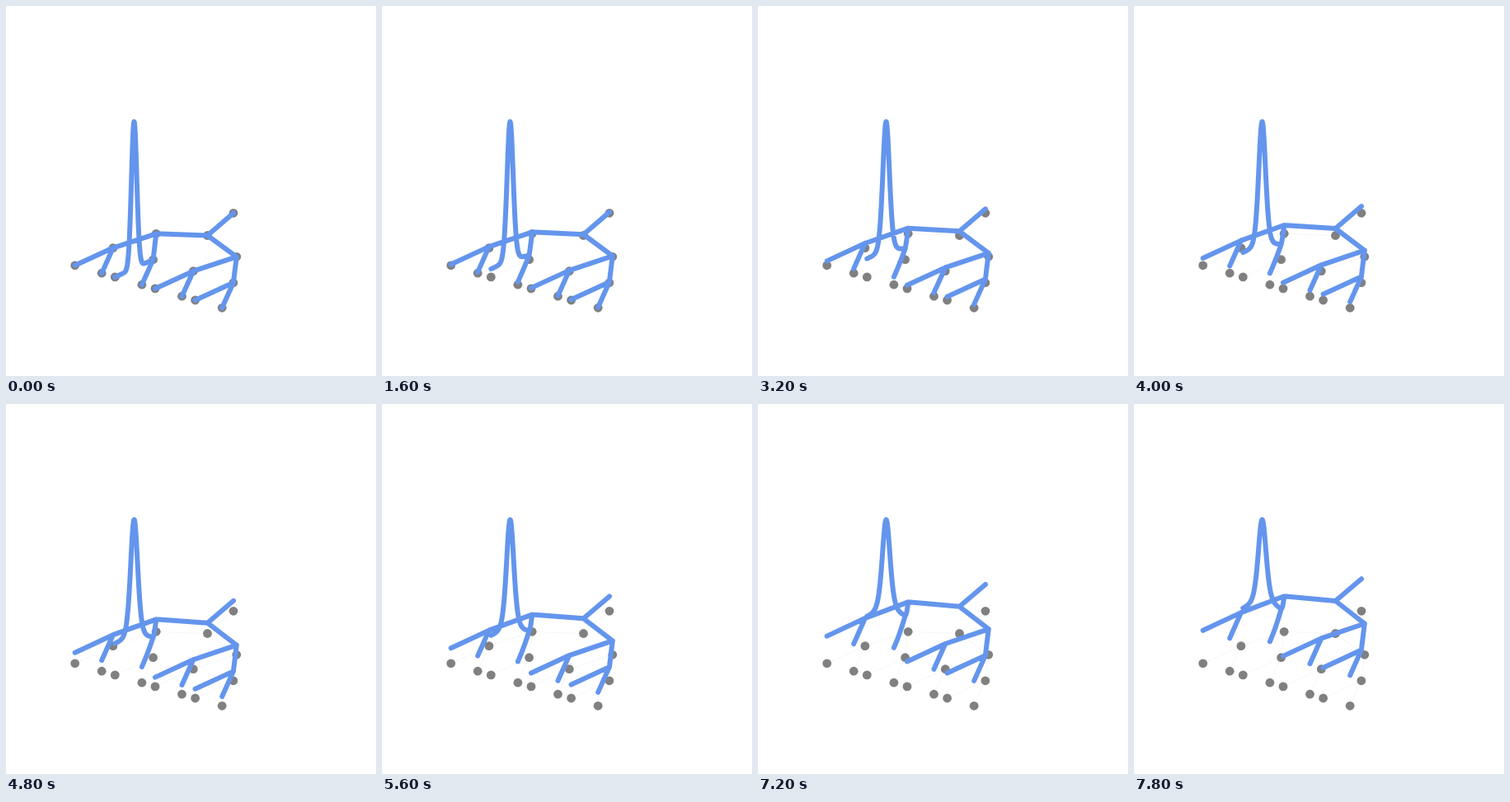
Write an HTML page that moves like this. It is 449x449 px and loops after 8 s.

```html
<!DOCTYPE html>
<html lang="en">
<head>
<meta charset="utf-8">
<title>Spreading on a tree</title>
<style>
  html, body { margin: 0; width: 100%; height: 100%; overflow: hidden; background: #fff; }
  svg { display: block; width: 100vw; height: 100vh; }
  path { fill: none; stroke-linecap: round; stroke-linejoin: round; }
  #ground { stroke: #f7f7f7; stroke-width: 1; }
  #dots { fill: #808080; }
  #surface { stroke: #6495ed; stroke-width: 6; }
</style>
</head>
<body>
<svg viewBox="0 0 449 449">
  <path id="ground"/>
  <g id="dots"></g>
  <path id="surface"/>
</svg>
<script>
  const LOOP = 8000, STEP = 200, LAST = LOOP / STEP - 1;
  const PEAK = 178;

  // x, y on the ground, and the final lift above the common level
  const nodes = {
    A: [276, 251.3, 2], B: [244.5, 278.5, 2.5], C: [182.2, 276.3, 6], D: [279.8, 304.3, 0.8],
    E: [129.9, 293.6, 3.5], F: [178.6, 307.7, 22], G: [83.7, 314.8, 3], H: [116.2, 324.2, 3],
    I: [132.3, 328.9, 44], J: [164.9, 338.2, 13], K: [227.3, 321.7, 0.3], L: [275.9, 335.8, 0.3],
    M: [181, 342.9, 0], N: [213.5, 352.2, 0], O: [229.6, 357, 0], P: [262.2, 366.3, 0]
  };
  const edges = 'AB BC BD CE FC EG EH IF FJ DK DL KM KN LO LP'.split(' ');
  const bent = ['FC', 'FJ'];

  const mix = (a, b, s) => a + (b - a) * s;
  const settle = s => 1 - (1 - s) ** 2;
  const polyline = points =>
    'M' + points.map(([x, y]) => x.toFixed(2) + ' ' + y.toFixed(2)).join('L');

  function spikeHeight(left, right, s, tau) {
    const d = 46.3 * (s - 0.5);
    const base = mix(left, right, Math.max(0, 2 * s - 1));
    const grow = tau ** 0.7;
    const sigma = 3.25 + 1.25 * grow;
    const k = 1 / (0.02 + 0.23 * grow);
    return base + (PEAK - base) * (1 + d * d / (2 * k * sigma * sigma)) ** -k;
  }

  function edgePath(name, tau) {
    const [a, b] = [...name].map(id => nodes[id]);
    const level = 37 * tau ** 2.45;
    const ha = level + a[2] * tau, hb = level + b[2] * tau;
    const spike = name === 'IF';
    const count = spike ? 120 : bent.includes(name) ? 12 : 1;
    const points = [];
    for (let i = 0; i <= count; i++) {
      const s = i / count;
      const h = spike ? spikeHeight(ha, hb, s, tau) : mix(ha, hb, settle(s));
      points.push([mix(a[0], b[0], s), mix(a[1], b[1], s) - h]);
    }
    return polyline(points);
  }

  const surface = document.getElementById('surface');
  document.getElementById('ground').setAttribute('d',
    edges.map(name => polyline([...name].map(id => nodes[id]))).join(''));
  document.getElementById('dots').innerHTML = Object.values(nodes)
    .map(([x, y]) => `<circle cx="${x}" cy="${y}" r="5.4"/>`).join('');

  let start;
  function draw(now) {
    start ??= now;
    const tau = Math.floor((now - start) % LOOP / STEP) / LAST;
    surface.setAttribute('d', edges.map(name => edgePath(name, tau)).join(''));
    requestAnimationFrame(draw);
  }
  requestAnimationFrame(draw);
</script>
</body>
</html>
```
